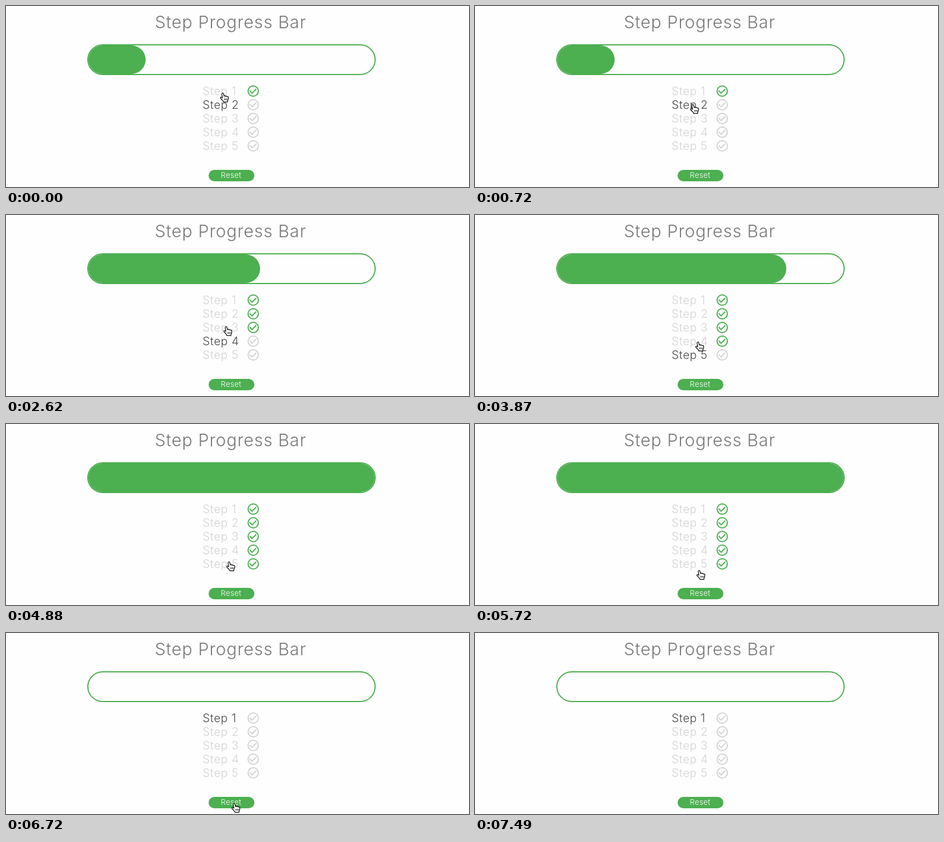
An HTML page with a canvas that plays this animation: 809 px wide and 317 px high, repeating every 8740 ms.

```html
<!DOCTYPE html>
<html lang="en">
<head>
<meta charset="utf-8">
<title>Step Progress Bar</title>
<style>
html, body { margin: 0; width: 100%; height: 100%; overflow: hidden; background: #fefefe; }
canvas { display: block; }
</style>
</head>
<body>
<canvas id="stage" width="809" height="317"></canvas>
<script>
const ctx = document.getElementById('stage').getContext('2d');
const LOOP = 8740;
const GREEN = '#4caf50', PALE = '#d3d3d3', DARK = '#484848', PAPER = '#fefefe';
const FONT = 'Inter, "Open Sans", sans-serif';

// Times at which the number of completed steps changes.
const progress = [[0, 1], [1430, 2], [2620, 3], [3870, 4], [4880, 5], [6720, 0]];

// Pointer moves: start, end, updates, destination x and y.
const origin = [374, 152];
const moves = [
  [540, 720, 4, 376, 172],
  [1850, 2030, 4, 379, 193],
  [2200, 2320, 3, 380, 195],
  [3160, 3330, 4, 385, 222],
  [4220, 4400, 4, 385, 241],
  [5480, 6180, 12, 394, 298]
];
const LEAVE = 7430, GONE = 7490;

const tick = new Path2D('M16.59 7.58 10 14.17 6.41 10.59 5 12 10 17 18 9Z');
const hand = new Path2D(
  'M4.2 9 3.1 2.8C2.7 .1 5.4 -.3 6 1.9L7.1 6C7.4 4.9 9.3 4.9 9.7 6.2' +
  'C10.2 5.3 11.8 5.6 12.1 6.9C12.8 6.1 14.4 6.6 14.6 8.3' +
  'C14.9 10.9 13.7 12.5 13.2 14L13 16.2H6.1L5.6 14.6' +
  'C4.3 13.2 2.6 11.4 1 9.7C-.1 8.2 1.7 7.1 2.9 8.1Z');
const creases = new Path2D('M7.7 10V13M9.8 10V13M11.9 10V13');

const ease = p => p * p * (3 - 2 * p);

function completed(t) {
  return progress.filter(([start]) => t >= start).pop()[1];
}

function pointerAt(t) {
  if (t >= GONE) return null;
  if (t >= LEAVE) return [434, 308];
  let [x, y] = origin;
  for (const [start, end, count, toX, toY] of moves) {
    if (t < start) break;
    const step = Math.floor((t - start) / (end - start) * (count - 1) + 1e-6) + 1;
    const p = ease(Math.min(1, step / count));
    x += (toX - x) * p;
    y += (toY - y) * p;
  }
  return [Math.round(x), Math.round(y)];
}

function text(str, x, y, size, color, spacing = 0) {
  ctx.font = `350 ${size}px ${FONT}`;
  ctx.letterSpacing = `${spacing}px`;
  ctx.fillStyle = color;
  ctx.fillText(str, x, y);
}

function pill(x, y, w, h) {
  ctx.beginPath();
  ctx.roundRect(x, y, w, h, h / 2);
}

function drawBar(done) {
  ctx.strokeStyle = ctx.fillStyle = GREEN;
  ctx.lineWidth = 2;
  pill(143, 68, 502, 52);
  ctx.stroke();
  if (done) {
    pill(144, 69, done * 100, 50);
    ctx.fill();
  }
}

function drawStep(i, done) {
  const y = 149 + i * 24;
  text(`Step ${i + 1}`, 343.5, y + 7, 20, i === done ? DARK : PALE, 0.6);
  ctx.strokeStyle = ctx.fillStyle = i < done ? GREEN : PALE;
  ctx.lineWidth = 2;
  ctx.beginPath();
  ctx.arc(432, y, 9, 0, Math.PI * 2);
  ctx.stroke();
  ctx.save();
  ctx.translate(420, y - 12);
  ctx.fill(tick);
  ctx.restore();
}

function drawPointer(x, y) {
  ctx.save();
  ctx.translate(x, y);
  ctx.lineJoin = 'round';
  ctx.fillStyle = '#fff';
  ctx.strokeStyle = '#000';
  ctx.lineWidth = 1.2;
  ctx.fill(hand);
  ctx.stroke(hand);
  ctx.lineWidth = 0.9;
  ctx.stroke(creases);
  ctx.restore();
}

function draw(t) {
  const done = completed(t);
  ctx.fillStyle = PAPER;
  ctx.fillRect(0, 0, 809, 317);
  text('Step Progress Bar', 260, 39, 30, '#7a7a7a', 0.85);
  drawBar(done);
  for (let i = 0; i < 5; i++) drawStep(i, done);
  ctx.fillStyle = GREEN;
  pill(354, 287, 80, 20);
  ctx.fill();
  text('Reset', 375.3, 301, 13.33, '#fff', 0.3);
  const pointer = pointerAt(t);
  if (pointer) drawPointer(...pointer);
}

const began = performance.now();
function frame() {
  draw((performance.now() - began) % LOOP);
  requestAnimationFrame(frame);
}
frame();
</script>
</body>
</html>
```
